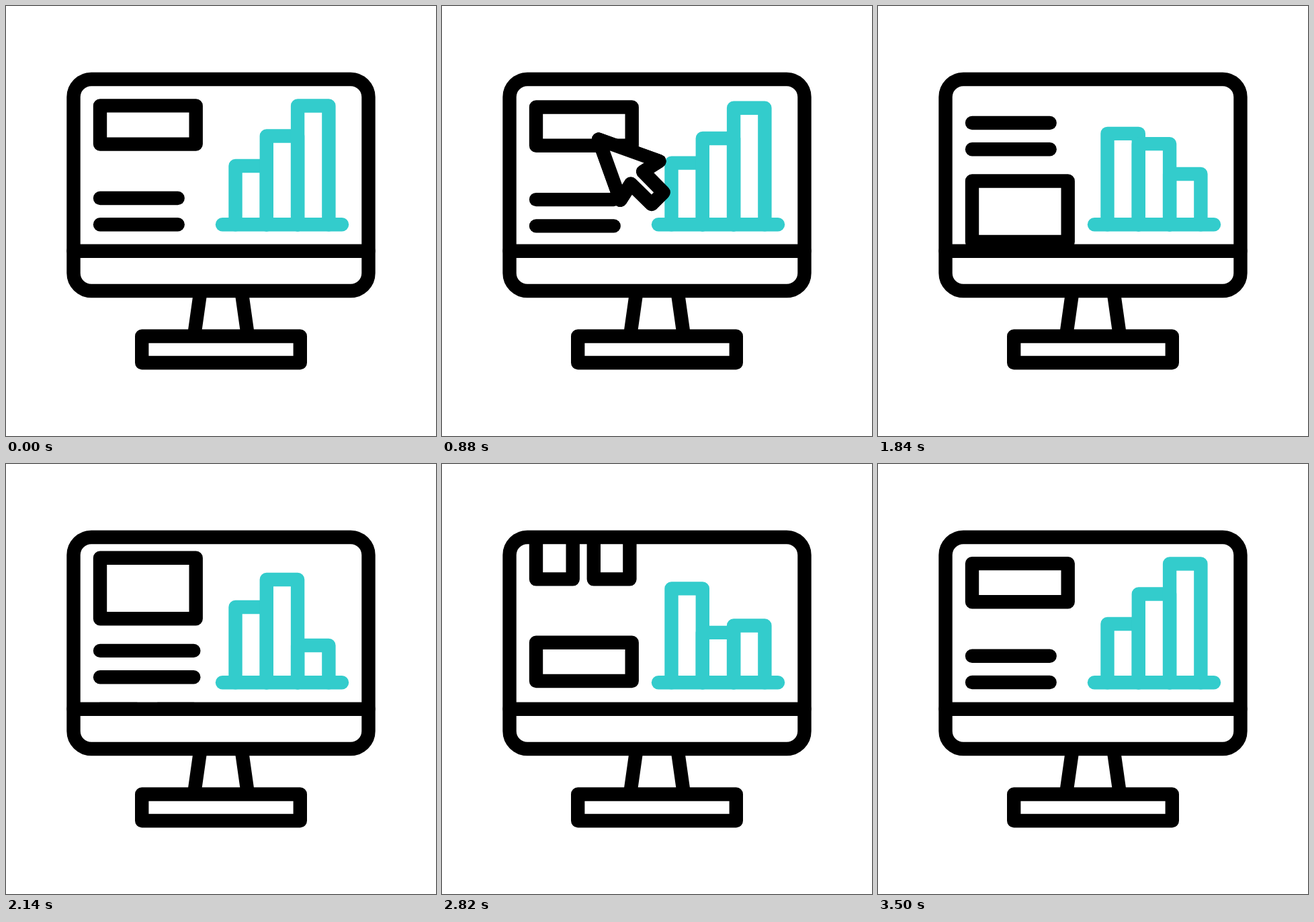
An HTML page with a canvas that plays this animation: 640x640 px, repeating every 3.6 s.

```html
<!DOCTYPE html>
<html lang="en">
<head>
<meta charset="utf-8">
<title>Dashboard monitor</title>
<style>
html, body { margin: 0; width: 100%; height: 100%; overflow: hidden; background: #fff; }
canvas { display: block; width: 640px; height: 640px; }
</style>
</head>
<body>
<canvas id="stage" width="640" height="640"></canvas>
<script>
const ctx = document.getElementById('stage').getContext('2d');
const LOOP = 3600, STEP = 20;
const BLACK = '#000', TEAL = '#33cccc';
const PAGE = 636.7; // height of the scrolling page
const LEFT = 140, LINE_GAP = 39.3, BASELINE = 325.3;

// Bar tops from left to right in each pose
const REST = [238, 193.5, 148.5], TALL_FIRST = [148.6, 264, 214.6];
const TALL_MIDDLE = [213, 172, 270], FALLING = [224, 237, 267.8];
const CHART = [
  { at: 800, tops: REST },
  { at: 1400, tops: TALL_FIRST },
  { at: 2140, tops: TALL_MIDDLE },
  { at: 2520, tops: FALLING },
  { at: 3110, tops: TALL_FIRST },
  { at: 3490, tops: REST }
];

// One half of the pointer, measured from its tip; the other half mirrors it
const POINTER_HALF = [[90.4, 32.5], [66, 48], [96.5, 79]];
const POINTER = [[0, 0], ...POINTER_HALF,
  ...POINTER_HALF.map(([x, y]) => [y, x]).reverse()];

const clamp = (v, low, high) => Math.min(high, Math.max(low, v));
const mix = (a, b, k) => a + (b - a) * k;

function ease(t, start, end) {
  const u = clamp((t - start) / (end - start), 0, 1);
  return u * u * (3 - 2 * u);
}

// Runs from -1 to 1 with a long, nearly even middle
function glide(t, centre, half) {
  const power = 2.3, x = clamp((t - centre) / half, -1, 1);
  return x * (power + 1 - Math.abs(x) ** power) / power;
}

// The page sinks a little, then runs up by its whole height
function scrollAt(t) {
  const dip = 5;
  const run = (1 + glide(t, 2331, 1050)) / 2;
  return dip * ease(t, 560, 1280) - (PAGE + dip + 0.3) * run;
}

function topsAt(t) {
  const next = CHART.findIndex(pose => pose.at > t);
  if (next < 1) return REST;
  const from = CHART[next - 1], to = CHART[next];
  const k = ease(t, from.at, to.at);
  return from.tops.map((top, i) => mix(top, to.tops[i], k));
}

function polyline(points, closed) {
  ctx.beginPath();
  points.forEach(([x, y]) => ctx.lineTo(x, y));
  if (closed) ctx.closePath();
  ctx.stroke();
}

function line(x0, y0, x1, y1) {
  polyline([[x0, y0], [x1, y1]]);
}

function textLines(y, right) {
  line(LEFT, y, right, y);
  line(LEFT, y + LINE_GAP, right, y + LINE_GAP);
}

function drawPage(y) {
  ctx.save();
  ctx.translate(0, y);
  ctx.strokeRect(LEFT, 148.4, 142.7, 57.2);
  textLines(286, 255.7);
  ctx.strokeRect(LEFT, 372.5, 142.7, 90.5);
  textLines(510.6, 279.3);
  ctx.strokeRect(LEFT, 597.7, 54.7, 93);
  ctx.strokeRect(LEFT + 85.8, 597.7, 53.6, 93);
  ctx.restore();
}

function drawChart(t) {
  ctx.strokeStyle = TEAL;
  topsAt(t).forEach((top, i) => {
    const width = 46.3, x = 341.5 + width * i;
    polyline([[x, BASELINE], [x, top], [x + width, top], [x + width, BASELINE]]);
  });
  line(322, BASELINE, 500, BASELINE);
  ctx.strokeStyle = BLACK;
}

function drawCursor(t) {
  const away = 1 - ease(t, 80, 640) + ease(t, 920, 1460);
  if (away >= 1) return;
  ctx.save();
  ctx.translate(233 + 38 * away, 198.5 + 172 * away);
  ctx.fillStyle = '#fff';
  polyline(POINTER, true);
  ctx.fill();
  polyline(POINTER, true);
  ctx.restore();
}

function drawMonitor() {
  for (const side of [-1, 1]) line(320 + side * 31.3, 430, 320 + side * 39.8, 490);
  ctx.strokeRect(202.2, 491.5, 235.6, 39.5);
  line(100.5, 364.8, 539.5, 364.8);
  ctx.beginPath();
  ctx.roundRect(100.5, 109, 439, 315, 26.5);
  ctx.stroke();
}

function draw(t) {
  ctx.fillStyle = '#fff';
  ctx.fillRect(0, 0, 640, 640);
  ctx.strokeStyle = BLACK;
  ctx.lineWidth = 20.4;
  ctx.lineCap = ctx.lineJoin = 'round';

  ctx.save();
  ctx.beginPath();
  ctx.rect(100, 109, 440, 256);
  ctx.clip();
  drawChart(t);
  const scroll = scrollAt(t);
  drawPage(scroll);
  drawPage(scroll + PAGE);
  drawCursor(t);
  ctx.restore();

  drawMonitor();
}

function tick() {
  const t = performance.now() % LOOP;
  draw(t < 100 ? 0 : Math.floor(t / STEP) * STEP);
  requestAnimationFrame(tick);
}
tick();
</script>
</body>
</html>
```
